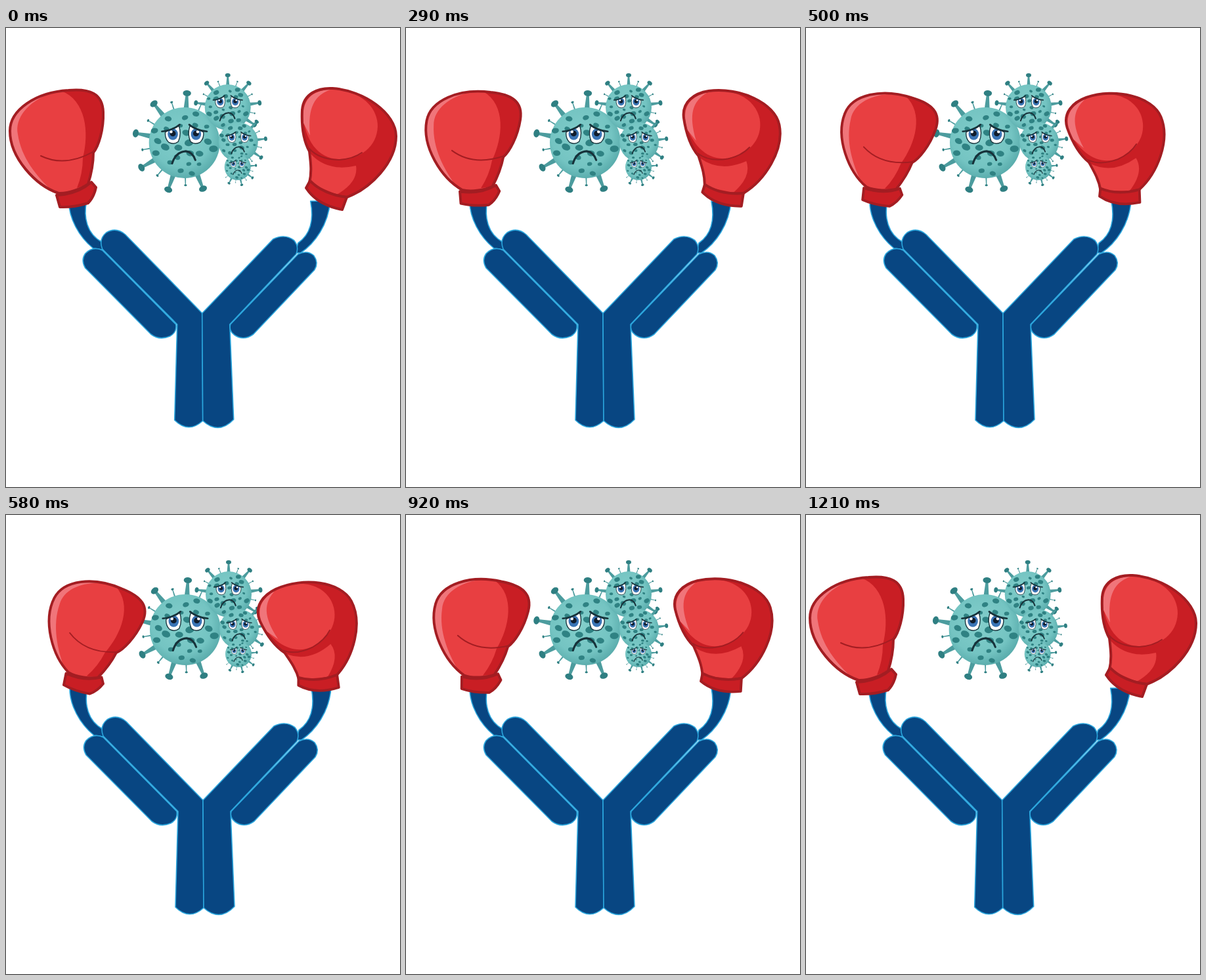
Animation, 600 px wide and 700 px high, one loop 1340 ms. Source, as an HTML page:

```html
<!DOCTYPE html>
<html lang="en">
<head>
<meta charset="utf-8">
<title>Boxing antibody</title>
<style>
html, body { margin: 0; width: 100%; height: 100%; overflow: hidden; background: #fff; }
svg { display: block; width: 600px; height: 700px; }
.chain { fill: #084682; stroke: #2ba6dd; stroke-width: 1.6; stroke-linejoin: round; }
.edge { stroke: #a31d22; stroke-width: 4; stroke-linejoin: round; }
.crease { fill: none; stroke: #a31d22; stroke-width: 2; stroke-linecap: round; }
.light { fill: #e83f41; }
.dark { fill: #c91e24; }
.pink { fill: #f0757a; }
.rim { fill: none; }
.ink { fill: none; stroke: #17323a; stroke-linecap: round; }
</style>
</head>
<body>
<svg viewBox="0 0 600 700">
  <defs>
    <radialGradient id="skin" cx=".45" cy=".42" r=".6">
      <stop offset="0" stop-color="#83cecb"/>
      <stop offset=".7" stop-color="#74c4c2"/>
      <stop offset="1" stop-color="#58abab"/>
    </radialGradient>
    <g id="face">
      <g id="eye">
        <path d="M-28-13Q-18-19-8-22Q-4-10-9 1Q-15 6-23 2Q-29-4-28-13Z" fill="#fff" stroke="#17323a" stroke-width="1.3"/>
        <ellipse cx="-17" cy="-10" rx="7.5" ry="8.5" fill="#3a74b5"/>
        <circle cx="-17" cy="-11" r="4.3" fill="#101c2c"/>
        <circle cx="-19.5" cy="-13.5" r="2.1" fill="#fff"/>
        <path d="M-33-14Q-18-15-7-24" class="ink" stroke-width="2.6"/>
      </g>
      <use href="#eye" transform="scale(-1 1)"/>
      <path d="M-18 33Q-13 16 2 15Q12 16 16 28" class="ink" stroke-width="3"/>
    </g>
    <path id="leftShape" d="M80 252C45 240 6 198 6 157C6 125 45 98 95 95C128 92 147 100 148 128C149 155 141 180 133 190C133 205 130 222 125 238C115 245 95 253 80 252Z"/>
    <path id="rightShape" d="M462 236C466 220 464 205 462 188C452 170 450 145 451 125C453 100 475 91 497 92C545 95 594 130 594 165C594 205 555 245 519 258C500 256 475 248 462 236Z"/>
  </defs>
  <g id="scene">
    <g id="germs"></g>
    <path class="chain" d="M97 264C97 290 112 318 134 336L148 338V327C124 314 119 288 124 264Z"/>
    <path class="chain" d="M495 264C492 300 472 328 450 343H442L446 328C466 314 470 290 465 264Z"/>
    <path class="chain" d="M148 339L260 452Q262 464 251 470Q235 477 222 467L122 366Q115 354 122 344Q134 332 148 339Z"/>
    <path class="chain" d="M446 345Q460 338 470 347Q478 358 471 369L378 467Q363 478 349 468Q340 461 343 452Z"/>
    <path class="chain" d="M300 435L183 315Q169 303 154 312Q142 322 148 337L262 452L258 598Q279 619 301 599Z"/>
    <path class="chain" d="M300 435L408 322Q426 313 440 324Q448 334 443 345L342 452L348 597Q325 621 301 599Z"/>
  </g>
  <g id="left">
    <use href="#leftShape" class="light"/>
    <path class="dark" d="M84 96C128 92 147 100 148 128C149 155 141 180 133 190C133 205 130 222 125 238L108 244Q117 222 117 198C127 160 122 110 84 96Z"/>
    <path class="pink" d="M80 252C45 240 6 198 6 157C6 130 34 108 66 100C34 113 13 137 18 162C23 197 46 226 72 250Z"/>
    <path class="crease" d="M53 195Q90 213 134 188"/>
    <use href="#leftShape" class="edge rim"/>
    <path class="edge dark" d="M77 255Q108 254 130 235L137 243Q134 258 125 267Q102 274 82 273Z"/>
  </g>
  <g id="right">
    <use href="#rightShape" class="dark"/>
    <path class="light" d="M464 192Q490 220 533 210Q537 235 504 254L464 237Z"/>
    <path class="light" d="M452 128C454 102 474 93 503 94C545 98 566 124 566 150C565 182 538 201 506 200C476 199 454 172 452 128Z"/>
    <path class="pink" d="M453 145C449 110 466 95 494 94C470 103 459 120 463 164Z"/>
    <path class="crease" d="M462 184Q476 200 506 201Q528 200 542 190"/>
    <use href="#rightShape" class="edge rim"/>
    <path class="edge dark" d="M463 233Q484 254 519 258L512 277Q474 270 457 244Z"/>
  </g>
</svg>
<script>
const NS = "http://www.w3.org/2000/svg";
const byId = id => document.getElementById(id);

function add(parent, tag, attrs) {
  const el = document.createElementNS(NS, tag);
  for (const key in attrs) el.setAttribute(key, attrs[key]);
  return parent.appendChild(el);
}

let seed = 7;
const random = () => (seed = seed * 16807 % 2147483647) / 2147483647;

// A tapered spike along the x axis, turned by deg around the body's centre
function spike(g, deg, length, size) {
  const s = add(g, "g", { transform: `rotate(${deg})` });
  const base = size * 1.4, tip = size * .28;
  add(s, "path", { d: `M0 ${-base}L${length} ${-tip}V${tip}L0 ${base}Z`, fill: "#4c9c9e" });
  add(s, "ellipse", { cx: length, rx: size * .72, ry: size, fill: "#2f7f82" });
}

// Spots follow a loose sunflower spiral so they cover the body evenly
function spots(g, r, count = 26) {
  for (let i = 0; i < count; i++) {
    const d = r * .92 * Math.sqrt((i + .5) / count);
    const a = i * 2.4 + random() * .3;
    const size = r * (.06 + random() * .07);
    const x = d * Math.cos(a), y = d * Math.sin(a);
    add(g, "ellipse", {
      rx: size, ry: size * .75, fill: "#2f8283",
      transform: `translate(${x} ${y}) rotate(${random() * 60 - 30})`
    });
  }
}

// Knobs sit at even turns from the first angle, a thin spike between each pair
function germ(x, y, r, firstAngle, knobs) {
  const STEP = 41;
  const g = add(byId("germs"), "g", { transform: `translate(${x} ${y})` });
  for (let i = 0; i < knobs; i++) {
    const deg = firstAngle + i * STEP;
    spike(g, deg + STEP / 2, r * 1.2, r * .04);
    spike(g, deg, r * 1.4, r * .115);
  }
  add(g, "circle", { r, fill: "url(#skin)" });
  spots(g, r);
  add(g, "use", { href: "#face", transform: `translate(0 ${-r * .05}) scale(${r / 52})` });
}

germ(273, 175, 54, 68, 6);
germ(339, 121, 35, -172, 6);
germ(355, 174, 30, -48, 3);
germ(354, 212, 20, -5, 4);

// Each time moves the punch one pose on: five in, five back out
const CHANGES = [210, 290, 420, 500, 580, 790, 920, 1000, 1080, 1210];
const LOOP = 1340;
const REACH = 5;
const start = performance.now();

// Gloves turn around the wrist and shrink slightly as they close in
function place(id, x, y, dx, turn, swing) {
  byId(id).setAttribute("transform",
    `translate(${x + dx * swing} ${y}) rotate(${turn * swing}) ` +
    `scale(${1 - .04 * swing}) translate(${-x} ${-y})`);
}

function draw() {
  const t = (performance.now() - start) % LOOP;
  const passed = CHANGES.filter(at => at <= t).length;
  const swing = 1 - Math.abs(REACH - passed) / REACH;
  place("left", 108, 255, 10, 27, swing);
  place("right", 488, 256, -11, -28, swing);
  byId("scene").setAttribute("transform", `translate(${swing ? 0 : -1.3} 0)`);
  requestAnimationFrame(draw);
}
draw();
</script>
</body>
</html>
```
